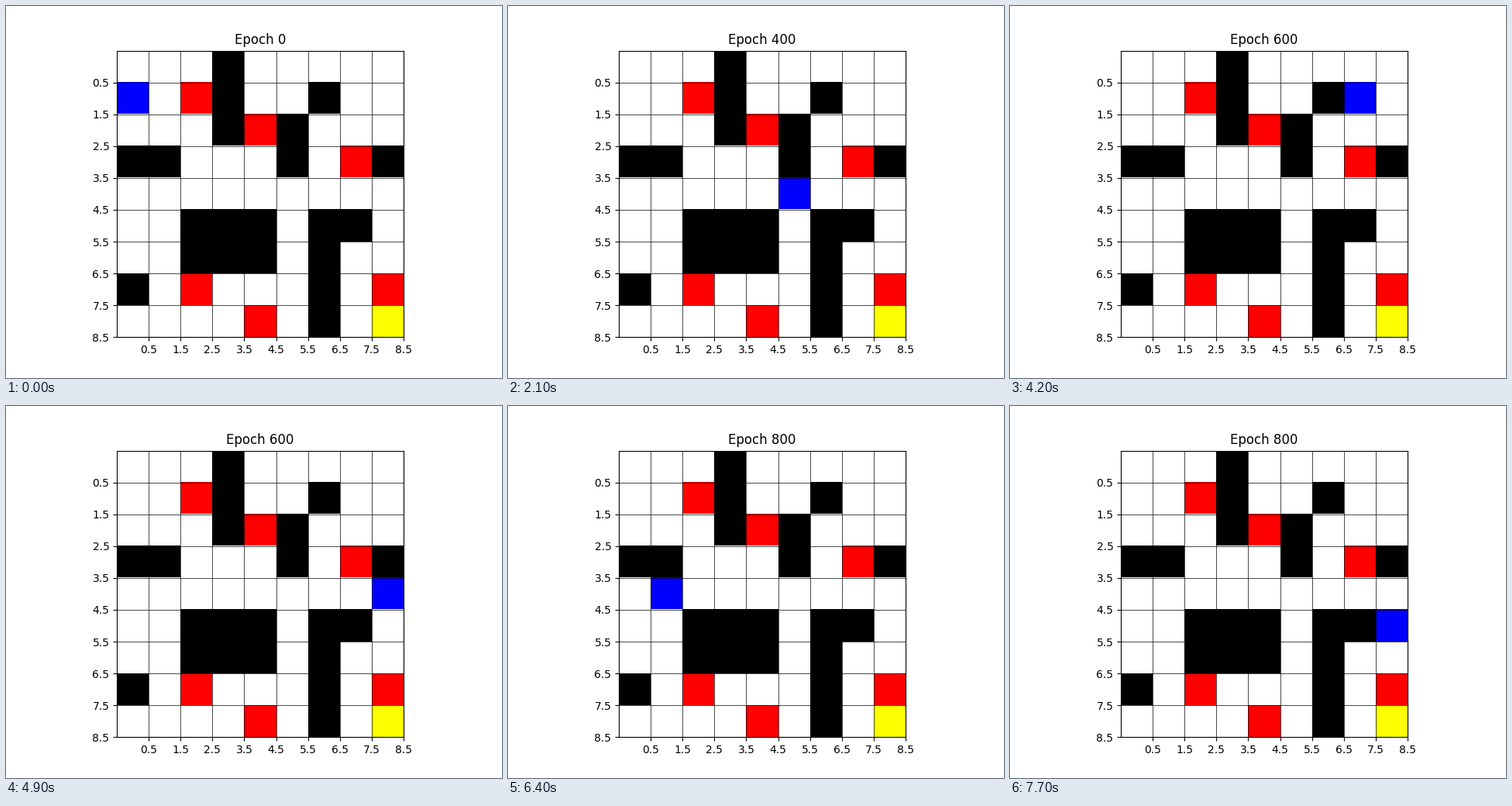
A matplotlib script for the animation above (8000 ms loop, 640x480 px).

```python
import numpy as np
import matplotlib.pyplot as plt
from matplotlib.animation import FuncAnimation

STEP_MS = 100

MAZE = [
    "...#.....",
    "..r#..#..",
    "...#r#...",
    "##...#.r#",
    ".........",
    "..###.##.",
    "..###.#..",
    "#.r...#.r",
    "....r.#.y",
]
COLORS = {
    ".": (255, 255, 255),
    "#": (0, 0, 0),
    "r": (255, 0, 0),
    "y": (255, 255, 0),
}
AGENT = (0, 0, 255)

# Epoch, start cell (column, row), then one move per step; "." waits.
EPISODES = [
    (0, (0, 1), "."),
    (200, (5, 0), ".R.RL.RL.R.DDD."),
    (200, (5, 8), ""),
    (400, (4, 3), "DRR..RRDD.L..DD.R"),
    (400, (1, 4), ""),
    (600, (8, 1), ".DLUDL.DDRRD.UDDLR.LDDR"),
    (600, (1, 4), "."),
    (800, (1, 4), ".RRR.RRUDR.RD.."),
]
MOVES = {".": (0, 0), "L": (-1, 0), "R": (1, 0), "U": (0, -1), "D": (0, 1)}


def walk():
    """Expand the episodes into one (epoch, column, row) per step."""
    steps = []
    for epoch, (col, row), moves in EPISODES:
        steps.append((epoch, col, row))
        for move in moves:
            dx, dy = MOVES[move]
            col, row = col + dx, row + dy
            steps.append((epoch, col, row))
    return steps


steps = walk()
maze = np.array([[COLORS[c] for c in line] for line in MAZE], dtype=np.uint8)

fig, ax = plt.subplots(figsize=(6.4, 4.8), dpi=100)
image = ax.imshow(maze)
ticks = np.arange(0.5, len(MAZE))
ax.set_xticks(ticks)
ax.set_yticks(ticks)
ax.grid(color="black", linewidth=0.5)
title = ax.set_title("")


def update(i):
    epoch, col, row = steps[i]
    board = maze.copy()
    board[row, col] = AGENT
    image.set_data(board)
    title.set_text(f"Epoch {epoch}")
    return image, title


anim = FuncAnimation(fig, update, frames=len(steps), interval=STEP_MS,
                     repeat=True, repeat_delay=0, blit=False)
plt.show()
```
